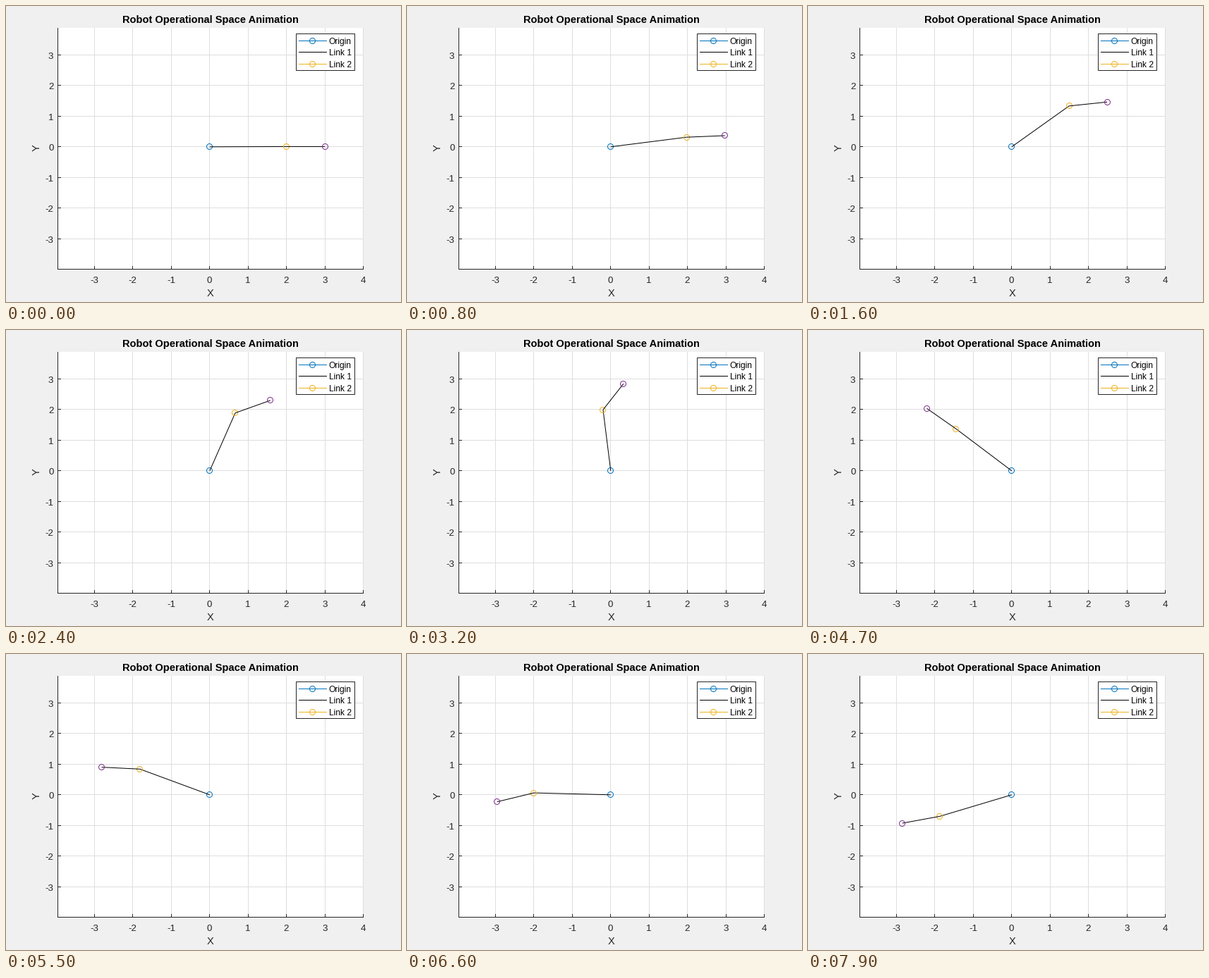
A matplotlib script that plays this animation: 560 by 420 pixels, repeating every 8 s.

```python
import numpy as np
import matplotlib.pyplot as plt
from matplotlib.animation import FuncAnimation
from matplotlib.patches import Circle, Rectangle

W, H, DPI = 560, 420, 100
PX = 72 / DPI                      # points per pixel
FRAMES, STEP = 80, 100
X0, Y0, UX, UY = 288.8, 199.8, 54.45, 43.53
LEFT, RIGHT, TOP, BOTTOM = 73, 506, 31, 373
INK, GRID = "#262626", "#dedede"
BLUE, GOLD, PURPLE = "#0072bd", "#edb120", "#7e2f8e"

# Times (s) and absolute angles (rad) of both links
KNOTS = np.array([0, .9, 1.6, 2.4, 2.7, 3.9, 4.5, 5.5, 6.6, 7.2, 7.9])
LINK1 = np.array([.004, .205, .728, 1.232, 1.395, 2.035, 2.30, 2.709,
                  3.11, 3.295, 3.50])
LINK2 = np.array([0, .06, .13, .42, .637, 1.607, 2.23, 3.08,
                  3.436, 3.446, 3.366])

plt.rcParams["font.family"] = "Liberation Sans"
fig = plt.figure(figsize=(W / DPI, H / DPI), dpi=DPI, facecolor="#f0f0f0")
ax = fig.add_axes([0, 0, 1, 1])
ax.set(xlim=(0, W), ylim=(H, 0))
ax.axis("off")


def to_px(x, y):
    return X0 + UX * x, Y0 - UY * y


def mid(v):
    """Centre of the pixel that holds v."""
    return np.floor(v) + .5


def line(xs, ys, color=INK, z=2):
    return ax.plot(xs, ys, color=color, lw=PX, zorder=z, snap=False,
                   solid_capstyle="butt")[0]


def box(x, y, w, h, z, edge="none"):
    ax.add_patch(Rectangle((x, y), w, h, fc="white", ec=edge, lw=PX,
                           snap=False, zorder=z))


def ring(x, y, color, z):
    return ax.add_patch(Circle((mid(x), mid(y)), 4, fc="none", ec=color,
                               lw=PX, zorder=z))


def label(x, y, text, size, color=INK, ha="center", **kw):
    kw.setdefault("va", "baseline")
    ax.text(x, y, text, fontsize=size * PX, color=color, ha=ha, zorder=12, **kw)


def draw_axes():
    box(LEFT, TOP, RIGHT + 1 - LEFT, BOTTOM + 1 - TOP, 0)
    base, side = BOTTOM + .5, LEFT + .5
    for v in range(-3, 5):
        x = mid(to_px(v, 0)[0])
        line([x, x], [TOP, base], GRID, 1)
        line([x, x], [base, base - 4.5])
        label(x - .5, 393, str(v), 13.33)
    for v in range(-3, 4):
        y = mid(to_px(0, v)[1])
        line([LEFT, RIGHT + 1], [y, y], GRID, 1)
        line([side, side + 4.5], [y, y])
        label(67.5, y + 5.5, str(v), 13.33, ha="right")
    line([LEFT, RIGHT + 1], [base, base])
    line([side, side], [TOP, BOTTOM + 1])
    label(290, 24, "Robot Operational Space Animation", 14.67, "black",
          weight="bold")
    label(290, 412.5, "X", 14.67)
    label(44, 201, "Y", 14.67, rotation=90, va="center")


def draw_legend():
    box(411.5, 39.5, 83, 52, 9, INK)
    rows = [("Origin", 49.5, BLUE), ("Link 1", 65.5, "black"),
            ("Link 2", 82.5, GOLD)]
    for name, y, color in rows:
        line([415, 455], [y, y], color, 10)
        if color != "black":
            ring(434.5, y, color, 11)
        label(457.5, y + 4.7, name, 12, "black", ha="left")


def glide(t, values):
    """Smooth Hermite curve through the knots, starting at rest."""
    slope = np.gradient(values, KNOTS)
    slope[0] = 0
    i = int(np.clip(np.searchsorted(KNOTS, t) - 1, 0, len(KNOTS) - 2))
    h = KNOTS[i + 1] - KNOTS[i]
    s = (t - KNOTS[i]) / h
    return ((1 + 2 * s) * (1 - s) ** 2 * values[i]
            + s * (1 - s) ** 2 * h * slope[i]
            + s * s * (3 - 2 * s) * values[i + 1]
            + s * s * (s - 1) * h * slope[i + 1])


draw_axes()
draw_legend()
ring(X0, Y0, BLUE, 4)
arm = line([], [], "black", 5)
elbow = ring(X0, Y0, GOLD, 6)
forearm = line([], [], "black", 7)
tip = ring(X0, Y0, PURPLE, 8)


def update(n):
    t = n * STEP / 1000
    a, b = glide(t, LINK1), glide(t, LINK2)
    ex, ey = 2 * np.cos(a), 2 * np.sin(a)
    px, py = to_px(ex, ey)
    qx, qy = to_px(ex + np.cos(b), ey + np.sin(b))
    arm.set_data([X0, px], [Y0, py])
    elbow.center = mid(px), mid(py)
    forearm.set_data([px, qx], [py, qy])
    tip.center = mid(qx), mid(qy)
    return arm, elbow, forearm, tip


anim = FuncAnimation(fig, update, frames=FRAMES, interval=STEP, repeat=True,
                     repeat_delay=0, blit=False)
plt.show()
```
